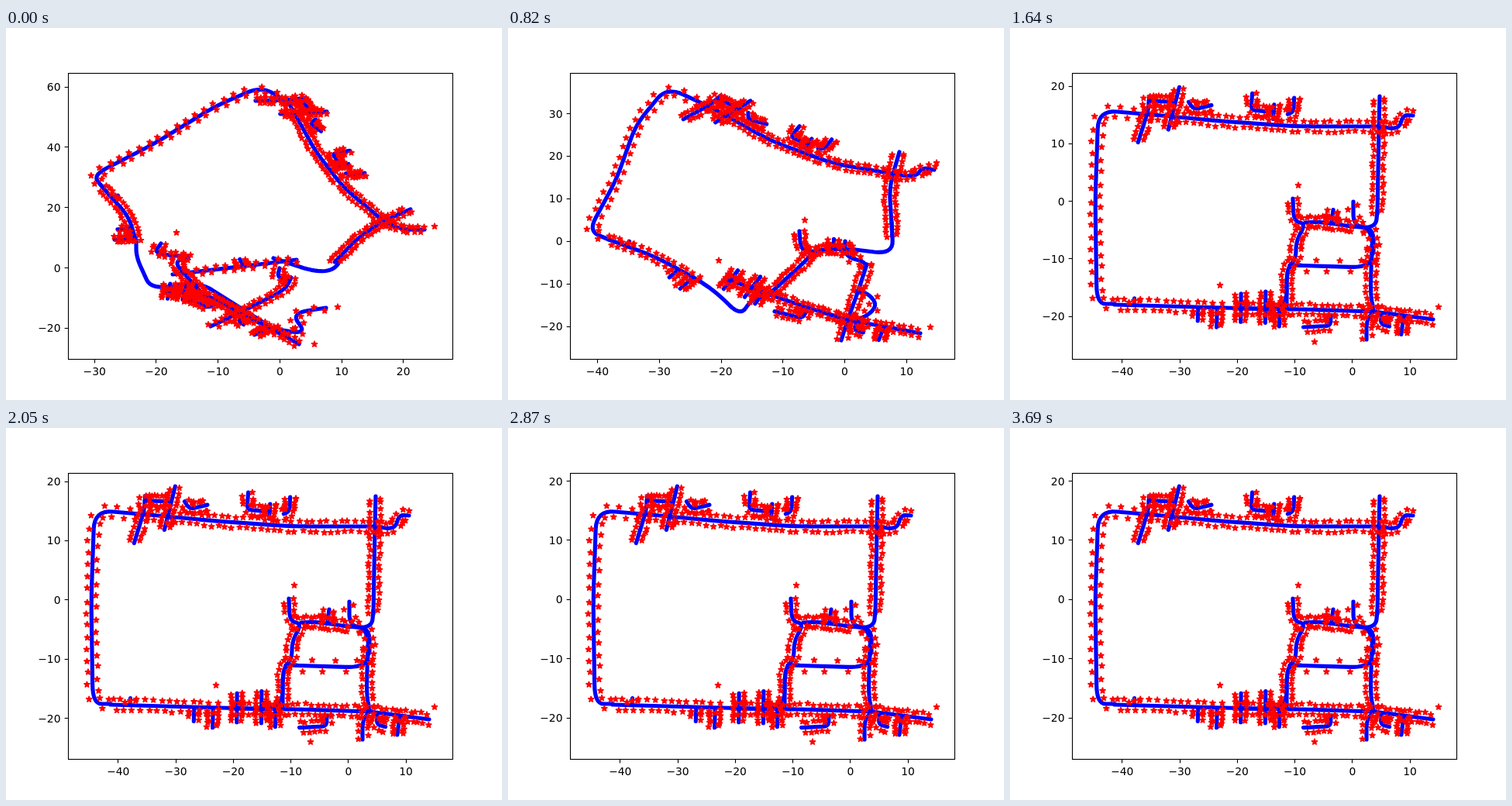
An HTML page with a canvas for the animation above (4.94 s loop, 640 by 480 pixels).

```html
<!DOCTYPE html>
<html lang="en">
<head>
<meta charset="utf-8">
<title>Map optimisation</title>
<style>
html, body { margin: 0; width: 100%; height: 100%; overflow: hidden; background: #fff; }
canvas { display: block; }
</style>
</head>
<body>
<canvas id="stage" width="640" height="480"></canvas>
<script>
const ctx = document.getElementById('stage').getContext('2d');
const STEP = 410, LOOP = 4940;

// Stars seen along each corridor of the map; the others are bare.
const starCounts = {
  start: 10, drop: 32, east: 24, south: 46, room: 46, hall: 24, north: 42,
  ne: 17, top: 64, left: 43, bottom: 27, tail: 12
};

// Side trips: corridor, fraction along it, stars, then "along,sideways" map units.
const spurs = [
  ['top', 0.38, 16, '0,4.9 0,2.5 1,2'],
  ['top', 0.47, 13, '0,3.5 0,1'],
  ['top', 0.57, 18, '0,5.2 0,2.3 -4,2.2'],
  ['top', 0.85, 16, '0,2.8 -1,1.6 -4,2.6'],
  ['top', 0.91, 20, '-.5,5.2 .7,-2.3'],
  ['top', 1, 20, '1,3.1 1,.5 2.2,-5'],
  ['top', 1, 16, '1,2.3 -3.4,2.6'],
  ['south', 0.31, 14, '0,-.9 0,-2.7 4.7,-3.1'],
  ['south', 0.68, 12, '0,0 0,-3'],
  ['south', 0.78, 20, '0,3 0,-2.4'],
  ['south', 0.956, 18, '0,2.6 0,-2.3'],
  ['bottom', 0.18, 2, '0,0 0,-1.2'],
  ['bottom', 0.77, 5, '0,.3 0,2.4'],
  ['bottom', 0.945, 12, '0,.3 0,3.4'],
  ['east', 0.13, 10, '0,.3 0,2 1.6,2.2'],
  ['east', 0.5, 14, '0,0 0,3.3'],
  ['hall', 0.57, 10, '0,0 0,-2.4']
];

// x, y: first value, value step, first pixel, pixel step, count.
// scale: size of a map unit in axis units. Corridors: corner points in pixels.
const skewed = {
  x: [-30, 10, 114.2, 79.7, 6], y: [60, -20, 76, 77.85, 5], scale: 1,
  start: '353,310 350,322 365,325',
  drop: '368,322 360,338 290,373 264,385',
  east: '300,367 340,387 378,408',
  south: '300,367 255,342 205,340',
  room: '255,345 215,300 245,295 190,292 200,278',
  hall: '215,318 310,307 375,299',
  turn: '345,297 400,315 424,312 434,295',
  north: '424,302 455,270 487,249 522,234',
  ne: '487,249 510,260 540,260',
  top: '487,249 435,205 400,160 365,97',
  left: '365,97 330,75 270,101 190,150 112,190 125,206',
  bottom: '125,206 158,243 168,275',
  link: '168,275 168,295 187,337 250,328 345,388',
  tail: '345,388 388,395 368,368 413,361',
  strays: '398,408 220,264 428,360 553,256'
};

const stretched = {
  x: [-100, 20, 120.8, 68.1, 7], y: [40, -20, 117.5, 76.15, 5], scale: 2.2,
  start: '461,270 467,285 472,298',
  drop: '472,298 475,345 482,387',
  east: '476,355 515,346 548,339',
  south: '476,356 400,365 325,350',
  room: '383,358 390,325 404,290 388,262',
  hall: '402,285 412,270 432,262',
  turn: '412,272 450,274 460,258 448,240',
  north: '450,242 422,195 412,150 406,118',
  ne: '412,155 434,152 436,130 447,130',
  top: '412,155 330,157 250,134 178,107',
  left: '178,107 115,88 110,150 145,245 172,334 190,335',
  bottom: '190,335 250,340 312,371',
  link: '312,371 340,385 405,402 425,338 480,338',
  tail: '480,338 525,303 545,306 544,272 516,272 519,237',
  strays: '553,324 306,322 409,410 225,321'
};

const folded = {
  x: [-40, 10, 115.5, 79.75, 6], y: [30, -10, 110.5, 54.9, 6], scale: 1,
  start: '435,275 435,295 462,302 460,312',
  drop: '463,305 450,345 438,377 430,403',
  east: '438,377 485,385 532,394',
  south: '438,377 360,352 280,323',
  room: '335,345 385,300 395,286 378,288 376,262',
  hall: '385,290 410,285 448,286',
  turn: '448,286 497,292 495,250',
  north: '496,270 492,205 505,160',
  ne: '496,189 527,192 534,180 550,183',
  top: '496,188 420,175 340,146 265,104',
  left: '265,104 205,76 165,125 140,195 104,262 130,273',
  bottom: '130,273 190,295 245,325',
  link: '245,325 270,342 300,372 314,350 335,345',
  tail: '400,365 450,380 478,360 465,342 448,340',
  strays: '545,386 383,248 272,300 553,174'
};

const tilted = {
  x: [-50, 10, 108.2, 67.7, 7], y: [10, -10, 124, 78.9, 4], scale: 1,
  start: '447,204 449,240 472,246 467,290',
  drop: '470,275 466,300 476,355 470,375 477,392',
  east: '476,352 515,344 550,338',
  south: '476,352 400,370 310,372',
  room: '377,365 377,315 386,285 400,262 387,258 378,225',
  hall: '388,259 410,248 440,243',
  turn: '440,243 476,246 471,215',
  north: '473,238 450,160 443,120 433,78',
  ne: '443,120 463,115 466,94 479,93',
  top: '443,120 360,134 270,128 180,120',
  left: '180,120 113,118 111,180 140,368 160,368',
  bottom: '160,368 292,367',
  link: '292,367 320,374 377,372 377,310',
  tail: '377,318 400,315 450,288 475,292 477,262 440,243',
  strays: '553,320 381,206 294,338 416,410'
};

const settled = {
  x: [-40, 10, 144.8, 74.25, 6], y: [20, -10, 68.5, 76.4, 5], scale: 1,
  start: '443,224 443,256 469,258 469,290',
  drop: '467,280 465,345 470,366 460,376 460,402',
  east: '470,366 508,371 546,376',
  south: '470,366 380,363 290,362',
  room: '357,362 357,310 369,298 369,275 382,252 366,250 365,220',
  hall: '381,251 400,250 440,256',
  turn: '440,256 472,258 474,235',
  north: '474,240 476,130 477,88',
  ne: '476,127 502,131 507,112 520,113',
  top: '476,127 370,127 270,120 185,112',
  left: '185,112 114,106 110,222 112,356 135,356',
  bottom: '135,357 275,361',
  link: '275,361 357,363 357,306 375,306',
  tail: '361,306 462,309 469,290 465,258 440,256',
  strays: '553,360 271,332 372,203 393,405'
};

const almost = { ...settled, y: [20, -10, 75, 74.33, 5] };
const nearly = { ...settled, y: [20, -10, 69, 76.4, 5] };
const poses = [skewed, stretched, folded, tilted, almost, nearly, settled];

const corridors = Object.keys(settled).filter(key => !['x', 'y', 'scale', 'strays'].includes(key));
const parse = text => text.split(' ').map(pair => pair.split(',').map(Number));
const mix = (a, b, t) => [a[0] + (b[0] - a[0]) * t, a[1] + (b[1] - a[1]) * t];
const distance = (a, b) => Math.hypot(b[0] - a[0], b[1] - a[1]);

function randomFrom(seed) {
  return () => {
    seed = (seed * 16807) % 2147483647;
    return seed / 2147483647;
  };
}

// Polyline with its corners rounded off by quadratic curves.
function rounded(points, reach) {
  const curve = [points[0]];
  for (let i = 1; i < points.length - 1; i++) {
    const p = points[i];
    const [from, to] = [points[i - 1], points[i + 1]].map(q =>
      mix(p, q, Math.min(0.5, reach / distance(p, q))));
    for (let t = 0; t <= 1; t += 0.125) {
      curve.push(mix(mix(from, p, t), mix(p, to, t), t));
    }
  }
  return [...curve, points[points.length - 1]];
}

// Position and heading at a fraction of the curve's length.
function locate(curve, fraction) {
  const spans = curve.slice(1).map((p, i) => distance(curve[i], p));
  let rest = fraction * spans.reduce((a, b) => a + b, 0), i = 0;
  while (i < spans.length - 1 && rest > spans[i]) rest -= spans[i++];
  const [a, b] = [curve[i], curve[i + 1]], span = spans[i] || 1;
  return { at: mix(a, b, rest / span), dx: (b[0] - a[0]) / span, dy: (b[1] - a[1]) / span };
}

const beside = ({ at, dx, dy }, along, side) =>
  [at[0] + dx * along - dy * side, at[1] + dy * along + dx * side];

// Stars at even distances, alternating between both sides of the curve.
function scatter(curve, count, seed) {
  const random = randomFrom(seed);
  return Array.from({ length: count }, (_, n) => {
    const side = (n % 2 ? 1 : -1) * (0.7 + 0.35 * random());
    return beside(locate(curve, (n + 0.5) / count), 0.5 * random() - 0.25, side);
  });
}

function drawStar(x, y) {
  ctx.beginPath();
  for (let i = 0; i < 10; i++) {
    const r = i % 2 ? 1.59 : 4.17, a = i * Math.PI / 5;
    ctx.lineTo(x + r * Math.sin(a), y - r * Math.cos(a));
  }
  ctx.closePath();
  ctx.fill();
  ctx.stroke();
}

// All geometry is done in map units, so spurs and stars shear with the axes.
function drawMap(pose) {
  const unitX = pose.scale * pose.x[3] / Math.abs(pose.x[1]);
  const unitY = pose.scale * pose.y[3] / Math.abs(pose.y[1]);
  const toMap = text => parse(text).map(([x, y]) => [x / unitX, y / unitY]);
  const paths = {};
  for (const name of corridors) paths[name] = rounded(toMap(pose[name]), 3.2);
  const tracks = corridors.map(name => [paths[name], starCounts[name] || 0]);
  for (const [name, fraction, count, shape] of spurs) {
    const base = locate(paths[name], fraction);
    tracks.push([rounded(parse(shape).map(p => beside(base, ...p)), 0.8), count]);
  }

  ctx.strokeStyle = '#00f';
  ctx.lineWidth = 5.2;
  ctx.lineCap = ctx.lineJoin = 'round';
  for (const [curve] of tracks) {
    ctx.beginPath();
    for (const [x, y] of curve) ctx.lineTo(x * unitX, y * unitY);
    ctx.stroke();
  }

  ctx.fillStyle = ctx.strokeStyle = '#f00';
  ctx.lineWidth = 1.39;
  ctx.lineJoin = 'bevel';
  const stars = tracks.flatMap(([curve, count], i) => scatter(curve, count, 7919 * (i + 1)));
  for (const [x, y] of [...stars, ...toMap(pose.strays)]) drawStar(x * unitX, y * unitY);
}

function drawAxis([value, step, pixel, gap, count], horizontal) {
  ctx.textAlign = horizontal ? 'center' : 'right';
  for (let i = 0; i < count; i++) {
    const at = pixel + i * gap, line = Math.floor(at) + 0.5;
    const label = String(value + i * step).replace('-', '\u2212');
    ctx.beginPath();
    if (horizontal) {
      ctx.moveTo(line, 427.5);
      ctx.lineTo(line, 432.4);
      ctx.fillText(label, at, 448);
    } else {
      ctx.moveTo(80.5, line);
      ctx.lineTo(75.6, line);
      ctx.fillText(label, 70.5, Math.round(at + 5));
    }
    ctx.stroke();
  }
}

function drawPose(pose) {
  ctx.fillStyle = '#fff';
  ctx.fillRect(0, 0, 640, 480);
  drawMap(pose);
  ctx.fillStyle = ctx.strokeStyle = '#000';
  ctx.lineWidth = 1.11;
  ctx.lineCap = 'butt';
  ctx.lineJoin = 'miter';
  ctx.font = '13.89px "DejaVu Sans", sans-serif';
  ctx.strokeRect(80.5, 58.5, 496, 369);
  drawAxis(pose.x, true);
  drawAxis(pose.y, false);
}

let shown = null;
function tick() {
  const slot = Math.floor(performance.now() % LOOP / STEP);
  const pose = poses[Math.min(slot, poses.length - 1)];
  if (pose !== shown) drawPose(shown = pose);
  requestAnimationFrame(tick);
}
tick();
</script>
</body>
</html>
```
